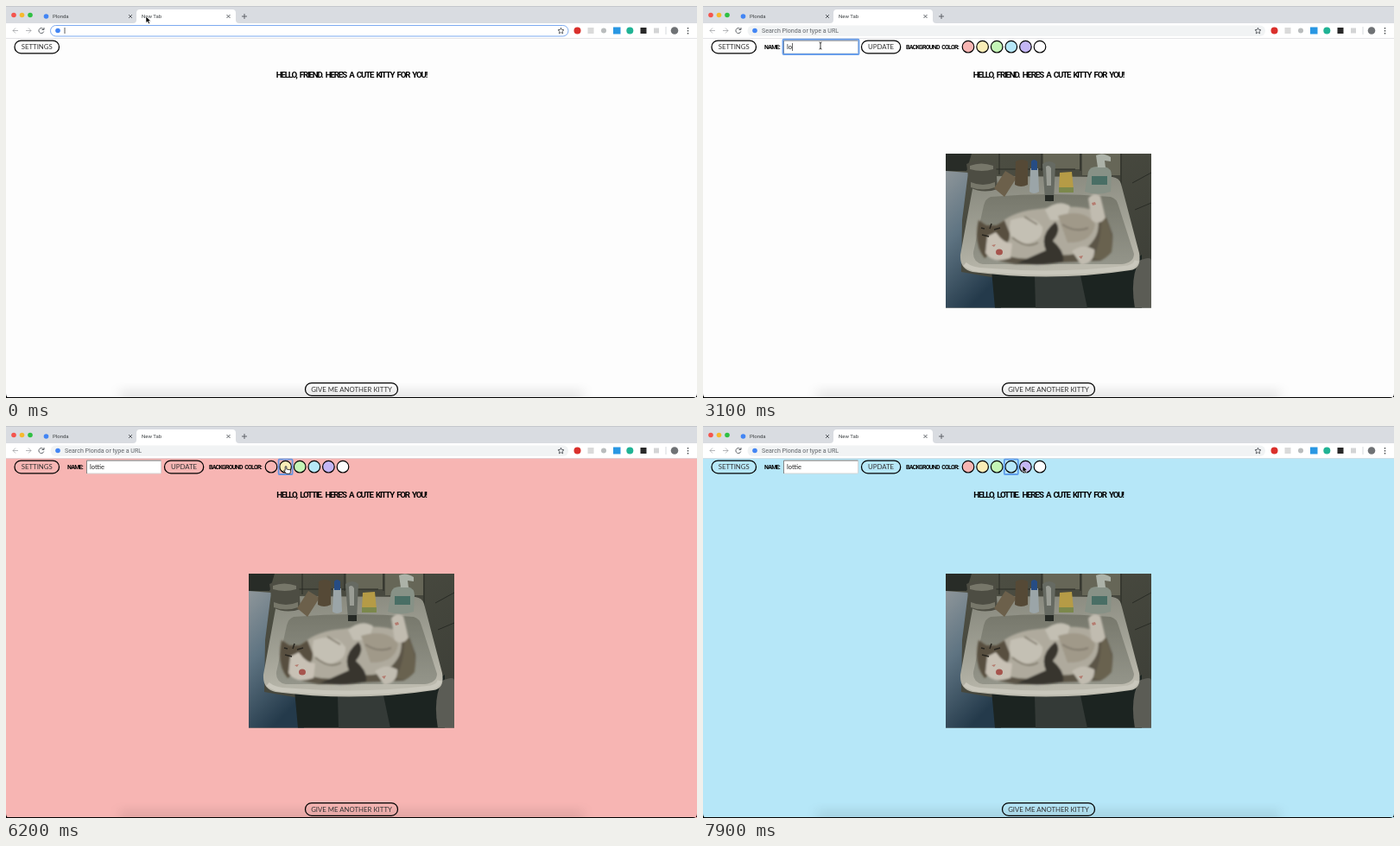
These frames come from a looping animation (800 by 454 pixels, 8 s). An HTML page:

```html
<!DOCTYPE html>
<html lang="en">
<head>
<meta charset="utf-8">
<title>Kitty tab</title>
<style>
  html, body { margin: 0; width: 100%; height: 100%; overflow: hidden; background: #fdfdfd; }
  svg { display: block; width: 800px; height: 454px; }
  .ui { font: 6px Roboto, sans-serif; fill: #3c4043; }
  .url { font: 7.1px Roboto, sans-serif; fill: #5f6368; }
  .btn { font: 7.8px Lato, sans-serif; fill: #333; }
  .field { font: 7.5px Lato, sans-serif; }
  .label { font: 700 7px Roboto, sans-serif; letter-spacing: -.75px; word-spacing: 1.5px; }
  .head { font: 700 9.7px Roboto, sans-serif; letter-spacing: -1.2px; word-spacing: 2px; text-anchor: middle; }
  .mid { text-anchor: middle; }
  .pill { fill: none; stroke: #000; stroke-width: 1.25; }
  .line { fill: none; stroke: #5f6368; stroke-width: 1; }
  .ring { fill: none; stroke: #4f8fe8; stroke-width: 1.8; stroke-opacity: .85; }
</style>
</head>
<body>
<svg viewBox="0 0 800 454">
  <defs>
    <linearGradient id="dock" x2="0" y2="1">
      <stop offset="0" stop-opacity="0"/><stop offset="1" stop-opacity=".09"/>
    </linearGradient>
    <linearGradient id="side" x2=".4" y2="1">
      <stop offset="0" stop-color="#8e969a"/><stop offset=".45" stop-color="#5f7482"/><stop offset="1" stop-color="#243a4b"/>
    </linearGradient>
    <linearGradient id="wall" y2="1">
      <stop offset="0" stop-color="#4f5044"/><stop offset="1" stop-color="#3b3d36"/>
    </linearGradient>
    <linearGradient id="rim" x2=".2" y2="1">
      <stop offset="0" stop-color="#85867b"/><stop offset=".6" stop-color="#a3a397"/><stop offset="1" stop-color="#bcbaae"/>
    </linearGradient>
    <linearGradient id="bowl" x2="0" y2="1">
      <stop offset="0" stop-color="#77786c"/><stop offset="1" stop-color="#94958a"/>
    </linearGradient>
    <clipPath id="crop"><path d="M281 171h238v178.500h-238z"/></clipPath>
    <filter id="soft"><feGaussianBlur stdDeviation="1.300"/></filter>
    <filter id="haze" x="-10%" width="120%"><feGaussianBlur stdDeviation="7 1"/></filter>
  </defs>

  <rect id="page" width="800" height="454"/>
  <rect x="132" y="436" width="536" height="18" fill="url(#dock)" filter="url(#haze)"/>

  <!-- browser bar -->
  <path fill="#d9dce1" d="M0 0h800v21H0z"/>
  <path fill="#bfc2c7" d="M0 0h800v.7H0z"/>
  <path fill="#fff" d="M147 20q4 0 4-4V8q0-4 4-4h107q4 0 4 4v8q0 4 4 4h530v17H0V20z"/>
  <path fill="#dcdde0" d="M0 37h800v.8H0z"/>
  <circle cx="9" cy="10.500" r="2.800" fill="#f4544d"/>
  <circle cx="18.500" cy="10.500" r="2.800" fill="#f6b92f"/>
  <circle cx="28" cy="10.500" r="2.800" fill="#2fc043"/>
  <circle cx="46.500" cy="12" r="2.800" fill="#4285f4"/>
  <text class="ui" x="54" y="14">Plonda</text>
  <text class="ui" x="157" y="14">New Tab</text>
  <path class="line" d="M142 10l4 4m0-4l-4 4M255.500 10l4 4m0-4l-4 4M273 12h6m-3-3v6"/>
  <path class="line" stroke-opacity=".45" d="M14 28.500H8m3-3l-3 3 3 3M23 28.500h6m-3-3l3 3-3 3"/>
  <path class="line" d="M43.500 27a3 3 0 1 0 .3 2.500M44 25v2.500h-2.500"/>
  <rect id="bar" x="51.500" y="22.500" width="599.500" height="12.500" rx="6.250"/>
  <circle cx="60" cy="28.500" r="2.800" fill="#4285f4"/>
  <text class="url" id="hint" x="68" y="31">Search Plonda or type a URL</text>
  <path id="urlCaret" d="M68 25v7" stroke="#333" stroke-width=".8"/>
  <path class="line" stroke-width=".8" d="M642.500 25.200l1 2.300 2.500.2-1.900 1.700.6 2.500-2.200-1.300-2.200 1.300.6-2.500-1.900-1.700 2.500-.2z"/>
  <circle cx="661.500" cy="28.500" r="4" fill="#da302c"/>
  <rect x="673.500" y="25" width="7" height="7" fill="#dadada"/>
  <circle cx="692" cy="28.500" r="3" fill="#b9bcbd"/>
  <rect x="703" y="24.500" width="8.500" height="8" fill="#2997e3"/>
  <circle cx="722.300" cy="28.500" r="4" fill="#20b395"/>
  <rect x="734.500" y="25" width="7" height="7" fill="#292929"/>
  <rect x="750" y="25.500" width="6" height="6" fill="#d3d4d5"/>
  <path d="M764 24v9" stroke="#ccd0d5" stroke-width=".8"/>
  <circle cx="774" cy="28.500" r="4.300" fill="#6f7275"/>
  <path d="M789.500 25v8" stroke="#4b4e51" stroke-width="1.500" stroke-dasharray="1.500 1.500"/>

  <!-- page controls -->
  <rect class="pill" x="10" y="40" width="51.500" height="14.800" rx="7.400"/>
  <text class="btn mid" x="35.700" y="50">SETTINGS</text>
  <rect class="pill" x="346.500" y="436.500" width="107" height="14.800" rx="7.400"/>
  <text class="btn mid" x="400" y="446.500">GIVE ME ANOTHER KITTY</text>
  <g id="panel">
    <text class="label" x="71" y="50">NAME:</text>
    <rect x="93.500" y="40" width="86" height="15" rx="1" fill="#fff" stroke="#d5d5d5"/>
    <path d="M93.500 55V40h86" fill="none" stroke="#858585"/>
    <text class="field" id="name" x="97" y="50"></text>
    <path id="nameCaret" d="M0 43v9" stroke="#222" stroke-width=".7"/>
    <rect class="pill" x="183.500" y="40" width="45.200" height="14.800" rx="7.400"/>
    <text class="btn mid" x="206" y="50">UPDATE</text>
    <text class="label" x="235" y="50">BACKGROUND COLOR:</text>
    <g id="dots" stroke="#000" stroke-width="1.200"></g>
  </g>
  <rect class="ring" id="ring" y="38.700" height="17.300" rx="1"/>
  <text class="head" id="greet" x="400" y="82.800"></text>

  <!-- cat in a sink -->
  <g id="photo" clip-path="url(#crop)">
    <path fill="url(#wall)" d="M281 171h238v179H281z"/>
    <path fill="#666657" d="M394 171h42v18h-42zM439 171h44v25h-44z"/>
    <path fill="none" stroke="#292b25" d="M281 189h150M343 171v24M392 171v20M437 171v20M484 171v65M500 236l19-8M497 205l22-12"/>
    <path fill="#282c27" d="M281 171h30l-6 20h-24z"/>
    <path fill="url(#side)" d="M281 191l26 2-7 55-1 60 46 8v35h-64z"/>
    <path fill="#1c2421" d="M334 306h150l24-18v62H338z"/>
    <path fill="#343a37" d="M384 312h53l8 38h-60z"/>
    <path fill="#5b5c55" d="M505 295q14-6 14 0v55h-19q-6-34 5-55z"/>
    <path fill="url(#rim)" d="M314 201q2-5 10-4l150 1q8 1 10 8l21 80q3 18-10 20-90 14-183 2-15-3-14-20z"/>
    <path fill="url(#bowl)" d="M333 221q70-6 139 0 7 2 9 10l18 56q0 10-14 12H324q-12-2-11-14l12-54q2-8 8-10z"/>
    <path fill="none" stroke="#c9c7bc" stroke-width="5" d="M303 299q8 7 24 7 85 7 165-3 9-2 10-8"/>
    <g filter="url(#soft)">
      <path fill="#5b5547" d="M438 234l26 3 10 27q2 24-14 31l-98 4-20-4-4-16 22-26z"/>
      <path fill="#afaa9d" d="M343 252q18-15 47-17 44-6 66 3 5 20-3 32-14 22-44 18-27 9-55 2-18-18-11-38z"/>
      <path fill="#c4c0b4" d="M356 248q25-9 37 8 2 17-23 20-19-5-14-28z"/>
      <path fill="#c3bfb3" d="M396 236q16-13 29-4l-5 16h-18z"/>
      <path fill="#a09989" d="M411 243q31-9 43 10-4 22-32 21z"/>
      <path fill="#39362d" d="M408 250q8 9-3 22 14 12 12 24-20 5-54 2l34-15q-8-18 11-33z"/>
      <path fill="#696250" d="M460 238q17 22 13 47-12 14-21 6 12-25 8-53z"/>
      <path fill="#585040" d="M319 248l9 6h12l9-6 6 15q1 12-8 14l-21 15q-13-16-7-44z"/>
      <path fill="#c8c1b5" d="M329 267l10-5q9 13 19 13l-2 17q-21 7-29-6z"/>
      <path fill="#c1bcb0" d="M446 223q6-8 14-3l6 25q-7 10-16 3zM427 284q13-10 26-2 1 15-15 18z"/>
      <path fill="none" stroke="#817b6d" stroke-width="2" d="M358 268q17 14 30 6M416 253q15 10 30 4M372 244l15 9"/>
    </g>
    <path fill="none" stroke="#28251f" stroke-width="1.500" d="M323 265l8 2m6-8l7-2M322 257l4 1M334 252l-2 6"/>
    <ellipse cx="343" cy="285" rx="4" ry="3.500" fill="#a6544d"/>
    <path fill="#b57c70" d="M334 277l5-1-2 3zM450 228l4-1 1 3-4 1zM435 290l5-1-2 4z"/>
    <path fill="#4d4d43" d="M305 183q17-8 34 0l2 29q-17 6-32-2z"/>
    <path fill="#77776a" d="M309 185q13-5 27 0v4q-13 4-27 0zM310 204q14 6 28 0v6q-14 5-28 0z"/>
    <path fill="#6c604b" d="M337 211l13-20 13 8-14 22z"/>
    <path fill="#554936" d="M362 180q7-4 14 0v27q-8 4-15 0z"/>
    <path fill="#9ba5a8" d="M379 188h9l1 27q-6 4-11 0z"/>
    <path fill="#264c84" d="M380 180q3-4 7 0v10h-7z"/>
    <path fill="#666a62" d="M393 183q8-6 15 0l-2 42q-5 4-10-1z"/>
    <path fill="#9a9d95" d="M397 186q4-3 6 2v20h-5z"/>
    <path fill="#262a25" d="M396 219h10v7h-10z"/>
    <path fill="#b59b46" d="M413 193l14-1 2 20-17 1z"/>
    <path fill="#7b884c" d="M412 210h17v6h-17z"/>
    <path fill="#879186" d="M446 192q2-6 10-6h9q8 2 8 10l-1 19q-15 5-30 0z"/>
    <path fill="#acb2a8" d="M455 173q8-4 17 2v5l-7-1 1 8h-9z"/>
    <path fill="#496e65" d="M450 197h18v10h-18z"/>
  </g>

  <path d="M0 453h800v1H0zM0 449q0 5 5 5H0zM800 449q0 5-5 5h5z"/>
  <g id="cursor">
    <path id="arrow" d="M0 0v7.500l1.800-1.600 1.300 2.800 1.400-.7-1.200-2.600h2.400z" stroke="#fff" stroke-width=".6"/>
    <path id="beam" d="M-1.500-4q1.500 0 1.500 1.200Q0-4 1.500-4M0-3v6M-1.500 4Q0 4 0 2.800 0 4 1.500 4" fill="none" stroke="#222" stroke-width=".9"/>
    <path id="hand" d="M-.8.500q.8-1 1.600 0v3l4 .8q1 .3.800 1.500l-.9 3H.5L-2.300 5q.2-1 1.500 0z" fill="#fff" stroke="#111" stroke-width=".8"/>
  </g>
</svg>
<script>
const $ = id => document.getElementById(id);
const LOOP = 8000;
const NAME = 'lottie';
const COLORS = ['#f7b5b3', '#f9edb7', '#c4f4b6', '#b6e7f8', '#c4b6f5', '#fdfdfd'];
const dotX = i => 307 + i * 16.6;

$('dots').innerHTML = COLORS.map((c, i) =>
  `<circle cx="${dotX(i)}" cy="47.200" r="6.800" fill="${c}"/>`).join('');

// time, x, y, pointer shape from then on
const MOVES = [
  [0, 162, 12, 'arrow'], [600, 162, 12, 'arrow'], [1100, 90, 32, 'arrow'],
  [1500, 35, 47, 'hand'], [1800, 35, 47, 'arrow'], [2150, 136, 42, 'beam'],
  [2250, 136, 42, 'beam'], [2400, 136, 46, 'beam'], [3800, 136, 46, 'beam'],
  [4050, 206.5, 53.5, 'hand'], [4700, 206.5, 53.5, 'arrow'], [5300, 311, 46.5, 'hand'],
  [5850, 311, 46.5, 'hand'], [6150, 324, 46.5, 'hand'], [6500, 324, 46.5, 'hand'],
  [6800, 340, 46.5, 'hand'], [7150, 340, 46.5, 'hand'], [7400, 356, 46.5, 'hand'],
  [7600, 356, 46.5, 'arrow'], [7900, 370, 46, 'arrow']
];

// time, left edge and width of the focus outline
const FOCUS = [
  [0, 0, 0], [1700, 8.5, 54], [2400, 92.5, 88], [4050, 182.5, 47.5],
  ...[5700, 6150, 6850, 7450].map((t, i) => [t, dotX(i) - 8, 16])
];
const PAGE = [[0, 5], [5800, 0], [6300, 1], [6900, 2], [7550, 3]];

const latest = (list, t) => list.findLast(row => row[0] <= t);
const show = (id, on) => $(id).setAttribute('visibility', on ? 'inherit' : 'hidden');
const ease = p => p * p * (3 - 2 * p);

function moveCursor(t) {
  const a = latest(MOVES, t);
  const b = MOVES[MOVES.indexOf(a) + 1] || a;
  const p = b === a ? 0 : ease((t - a[0]) / (b[0] - a[0]));
  const [x, y] = [1, 2].map(i => a[i] + (b[i] - a[i]) * p);
  $('cursor').setAttribute('transform', `translate(${x} ${y})`);
  for (const kind of ['arrow', 'beam', 'hand']) show(kind, kind === a[3]);
}

function draw(t) {
  const blink = t % 1000 < 500;
  const urlFocus = t < 1700;
  show('photo', t >= 300);
  show('hint', t >= 300);
  show('urlCaret', urlFocus && blink);
  $('bar').setAttribute('fill', urlFocus ? '#fff' : '#f1f3f4');
  $('bar').setAttribute('stroke', urlFocus ? '#7daaf0' : 'none');
  show('panel', t >= 1700);

  const typed = NAME.slice(0, Math.max(0, Math.floor((t - 2700) / 150)));
  const name = $('name');
  name.textContent = typed || 'Type your name here..';
  name.setAttribute('fill', typed ? '#222' : '#858585');
  const caretX = 97.5 + (typed ? name.getComputedTextLength() : 0);
  $('nameCaret').setAttribute('transform', `translate(${caretX})`);
  show('nameCaret', t >= 2400 && t < 4050 && blink);

  const [, x, width] = latest(FOCUS, t);
  $('ring').setAttribute('x', x);
  $('ring').setAttribute('width', width);
  show('ring', width > 0);

  const friend = t < 4300 ? 'FRIEND' : NAME.toUpperCase();
  $('greet').textContent = `HELLO, ${friend}. HERE'S A CUTE KITTY FOR YOU!`;
  $('page').setAttribute('fill', COLORS[latest(PAGE, t)[1]]);
  moveCursor(t);
}

const start = performance.now();
function tick() {
  draw((performance.now() - start) % LOOP);
  requestAnimationFrame(tick);
}
tick();
</script>
</body>
</html>
```
